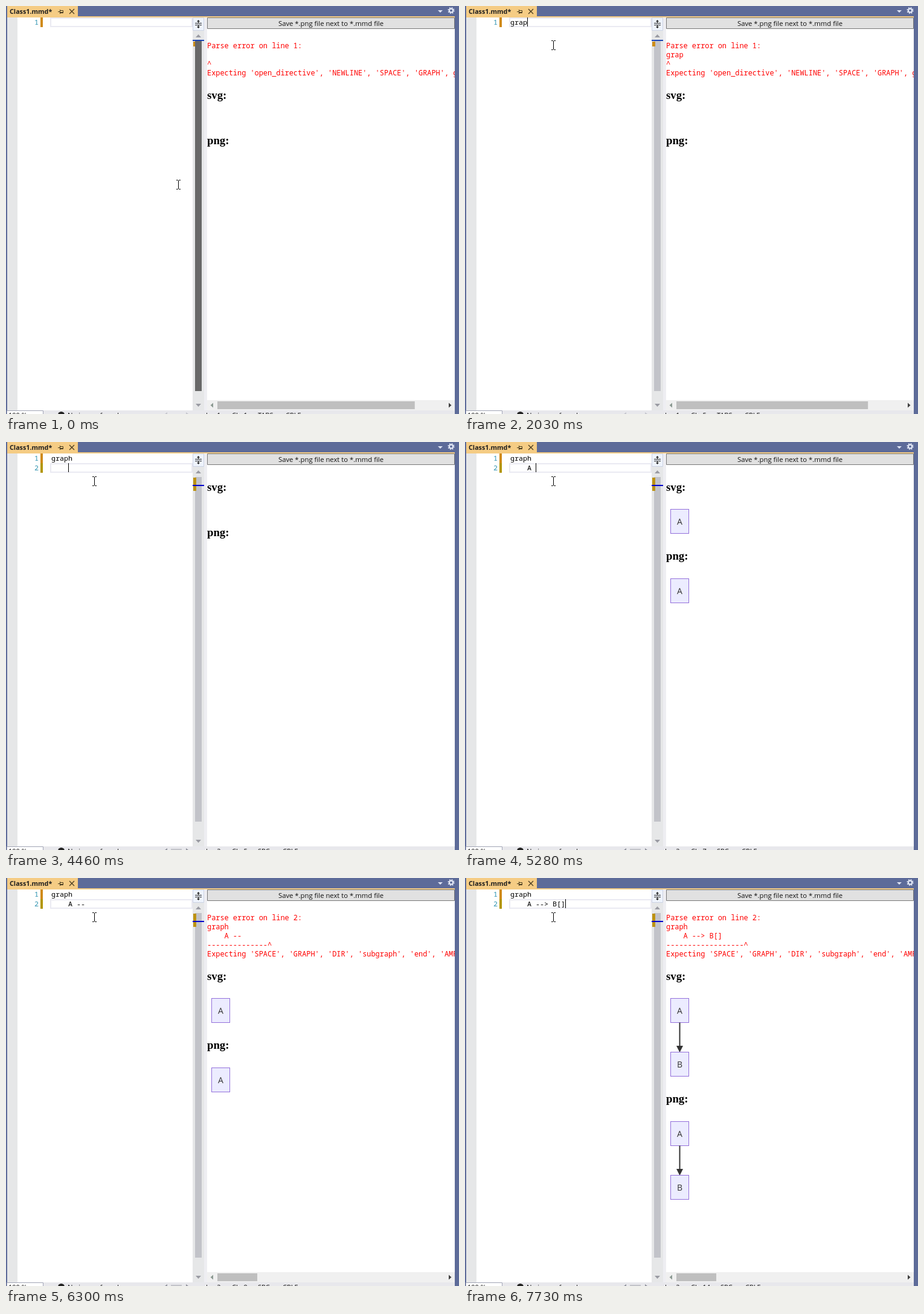
An HTML page for the animation above (8 s loop, 750 by 676 pixels).

```html
<!DOCTYPE html>
<html lang="en">
<head>
<meta charset="utf-8">
<title>Diagram editor</title>
<style>
  html, body { margin: 0; width: 100%; height: 100%; overflow: hidden; background: #fff; }
  svg { display: block; width: 750px; height: 676px; }
  text { white-space: pre; }
  .code { font: 11.667px "Noto Sans Mono", monospace; fill: #000; }
  .num { fill: #2b91af; }
  .error { font: 11.913px "Noto Sans Mono", monospace; fill: #f00; }
  .title { font: bold 18.72px "Liberation Serif", serif; }
  .ui { font: 11.3px "Open Sans", sans-serif; fill: #111; }
  .status { font-size: 11px; }
  .tab { font: bold 10.75px "Open Sans", sans-serif; fill: #1e1e1e; }
  .node { fill: #ececff; stroke: #9370db; }
  .label { font: 14px "Open Sans", sans-serif; fill: #333; text-anchor: middle; }
</style>
</head>
<body>
<svg viewBox="0 0 750 676">
  <defs><clipPath id="pane"><path d="M333 19h410v651H333z"/></clipPath></defs>

  <path fill="#5d6b99" d="M0 0h750v676H0z"/>
  <path fill="#f5cc84" d="M2 0h117v17h624v2H2z"/>
  <path fill="#fff" d="M19 19h724v651H19z"/>
  <path fill="#e6e7e8" d="M2 19h17v651H2zM309 19h19v651h-19z"/>
  <path fill="#eeeef2" d="M328 19h5v651h-5z"/>

  <text class="tab" x="6" y="13">Class1.mmd*</text>
  <path fill="none" stroke="#4a3c20" d="M86 9.5h3M89.5 6v7M90 7.5h4.500v4H90M90 10.500h4"/>
  <path fill="none" stroke="#4a3c20" stroke-width="1.300" d="M105 5l8 8M113 5l-8 8"/>
  <path fill="#dfe5f5" d="M715 7h8l-4 4z"/>
  <circle cx="737" cy="7.500" r="3" fill="none" stroke="#e6ebf8" stroke-width="2"/>
  <circle cx="737" cy="7.500" r="4.700" fill="none" stroke="#e6ebf8" stroke-width="1.800" stroke-dasharray="1.850"/>

  <path fill="#eef3fc" stroke="#ccd3e4" d="M309.500 19.500h18v21h-18z"/>
  <path fill="none" stroke="#1e1e1e" d="M313 28.500h11M313 31.500h11M318.500 24v4M318.500 32v4"/>
  <path fill="#1e1e1e" d="M316 26l2.500-3 2.500 3zM316 34l2.500 3 2.500-3z"/>
  <path fill="#9a9ba3" d="M314 52l4.500-5 4.500 5zM314 659l4.500 5 4.500-5z"/>

  <path fill="#e1e1e1" stroke="#777" d="M333.500 19.500h409v18h-409z"/>
  <text class="ui" x="538" y="33" text-anchor="middle">Save *.png file next to *.mmd file</text>

  <path fill="#e8e8ec" d="M2 670h741v6H2z"/>
  <path fill="#fff" stroke="#a0a4b4" d="M1.500 670.500h60v8h-60z"/>
  <circle cx="91.500" cy="677.500" r="5.500" fill="#222"/>
  <g class="ui status">
    <text x="4" y="682">100 %</text>
    <text x="102" y="682" font-size="11.3">No issues found</text>
  </g>
  <g id="live"></g>
</svg>
<script>
const LOOP = 8000;
const CHAR = 7, ERROR_CHAR = 7.148, PANE = 410, TRACK = 376;

const expecting = (names, got) =>
  `Expecting ${names.split(' ').map(n => `'${n}', `).join('')}got '${got}'`;
const problem = (message, dashes = 0, thumb = TRACK * PANE / (message.length * ERROR_CHAR)) =>
  ({ message, dashes, thumb });

const header = 'open_directive NEWLINE SPACE GRAPH';
const empty = problem(expecting(header, 'EOF'));
const word = problem(expecting(header, 'ALPHA'));
const direction = problem(expecting('NODIR DIR', '1'), 5);
const afterNode = problem(expecting('SEMI NEWLINE EOF AMP START_LINK LINK', '1'), 12);
const statement = expecting('SPACE GRAPH DIR subgraph end AMP ALPHA', 'EOF');
const target = expecting('SPACE AMP COLON PIPE TESTSTR DOWN DEFAULT NUM COMMA ALPHA MINUS BRKT DOT ' +
  'PUNCTUATION UNICODE_TEXT PLUS EQUALS MULT UNDERSCORE', 'EOF');

// start time, code, caret shown, nodes drawn, error
const steps = [
  [0, '', false, '', empty],
  [610, '', true, '', empty],
  [1020, '', false, '', empty],
  [1620, 'g', true, '', word],
  [1840, 'gr', true, '', word],
  [2030, 'grap', true, '', word],
  [2430, 'graph', true, '', direction],
  [2840, 'graph', false, '', direction],
  [3040, 'graph\n', true, ''],
  [3650, 'graph\n ', true, ''],
  [3860, 'graph\n  ', true, ''],
  [4060, 'graph\n   ', true, ''],
  [4460, 'graph\n    ', true, ''],
  [4870, 'graph\n    ', false, ''],
  [5070, 'graph\n    A', true, 'A'],
  [5280, 'graph\n    A ', true, 'A'],
  [5480, 'graph\n    A ', true, 'A', afterNode],
  [5700, 'graph\n    A --', true, 'A', problem(statement, 14, 66)],
  [6300, 'graph\n    A --', false, 'A', problem(statement, 14, 66)],
  [6510, 'graph\n    A -->', true, 'A', problem(target, 15)],
  [6710, 'graph\n    A --> ', true, 'A', problem(target, 16)],
  [7120, 'graph\n    A --> B', true, 'AB'],
  [7730, 'graph\n    A --> B[]', true, 'AB', problem(statement, 18, 66)]
];
const pointerStops = [[0, 285, 296], [200, 179, 160], [400, 146, 65]];

const at = (list, time) => list.findLast(item => item[0] <= time);
const escape = s => s.replace(/&/g, '&amp;').replace(/</g, '&lt;').replace(/>/g, '&gt;');
const rect = (x, y, w, h, fill) =>
  `<rect x="${x}" y="${y}" width="${w}" height="${h}" fill="${fill}"/>`;
const text = (kind, x, y, s) => `<text class="${kind}" x="${x}" y="${y}">${escape(s)}</text>`;

function editor(lines, caret) {
  const row = lines.length - 1, top = 19 + 16 * row;
  const colors = ['#d08a18', '#b29600'];
  return `<rect x="74" y="${top + 1}" width="234" height="14" fill="none" stroke="#eaeaf2" stroke-width="2"/>` +
    lines.map((line, i) =>
      rect(57, 19 + 16 * i, 4, 16, colors[i]) +
      text('code num', 47, 31 + 16 * i, String(i + 1)) +
      text('code', 75, 31 + 16 * i, line)).join('') +
    (caret ? rect(75 + CHAR * lines[row].length, top, 1, 15, '#000') : '');
}

function scrollbar(row, hovered) {
  const thumb = rect(313, 58, 11, row ? 571 : 580, hovered ? '#686868' : '#c2c3c9');
  const mark = rect(310, 59, 5, row ? 22 : 8, row ? '#bd9210' : '#cc8c18');
  return (hovered ? mark + thumb : thumb + mark) +
    rect(309, row ? 71 : 56, 19, 2, row ? '#0000cd' : '#1c46b4');
}

function diagram(nodes, top) {
  return [...nodes].map((name, i) => {
    const y = top + 89 * i;
    const arrow = i ? `<path d="M355.500 ${y - 49}v40" stroke="#333" stroke-width="2"/>` +
      `<path d="M350 ${y - 10.5}h11l-5.500 11z" fill="#333"/>` : '';
    return `${arrow}<rect class="node" x="340.500" y="${y}" width="30" height="40"/>` +
      text('label', 355.5, y + 25.5, name);
  }).join('');
}

function preview(lines, nodes, error) {
  const report = error ? [`Parse error on line ${lines.length}:`, ...lines,
    '-'.repeat(error.dashes) + '^', error.message] : [];
  const svgTitle = 81 + (error ? 13 + 15 * report.length : 0);
  const pngTitle = svgTitle + [75, 114, 203][nodes.length];
  const scroll = error && error.message.length * ERROR_CHAR > PANE
    ? rect(333, 653, 410, 17, '#f0f0f0') + rect(350, 655, error.thumb, 13, '#bfbfbf') +
      '<path fill="#8c9a92" d="M343 657.500v8l-4.500-4z"/><path fill="#404040" d="M733 657.500v8l4.500-4z"/>'
    : '';
  return `<g clip-path="url(#pane)">` +
    report.map((line, i) => text('error', 333, 70 + 15 * i, line)).join('') +
    text('title', 333, svgTitle, 'svg:') + diagram(nodes, svgTitle + 30.5) +
    text('title', 333, pngTitle, 'png:') + diagram(nodes, pngTitle + 31.5) +
    scroll + '</g>';
}

function status(lines) {
  const row = lines.length - 1, column = lines[row].length + 1;
  const spaces = lines[row].startsWith('    ');
  const shift = column > 9 ? 6 : 0;
  const arrows = `<path fill="${row ? '#8e909a' : '#c4c5cc'}" d="M267 673v6l-4-3zM298 673v6l4-3z"/>`;
  return arrows + (row ? rect(273, 674, 18, 2, '#c2c3c9') : '') +
    text('ui status', 331, 682, `Ln: ${row + 1}`) +
    text('ui status', 374, 682, `Ch: ${column}`) +
    text('ui status', 417 + shift, 682, spaces ? 'SPC' : 'TABS') +
    text('ui status', (spaces ? 458 : 463) + shift, 682, 'CRLF');
}

function pointer(x, y) {
  return `<path fill="none" stroke="#000" transform="translate(${x} ${y})"
    d="M-3 -7.500h2.500l1 1 1-1h2.500M.5 -7v14M-3 7.500h2.500l1-1 1 1h2.500"/>`;
}

const live = document.getElementById('live');
let shown = '';

function draw() {
  const time = performance.now() % LOOP;
  const [, code, caret, nodes, error] = at(steps, time);
  const [, x, y] = at(pointerStops, time);
  const lines = code.split('\n');
  const picture = editor(lines, caret) + scrollbar(lines.length - 1, time < 200) +
    preview(lines, nodes, error) + status(lines) + pointer(x, y);
  if (picture !== shown) live.innerHTML = shown = picture;
  requestAnimationFrame(draw);
}
draw();
</script>
</body>
</html>
```
